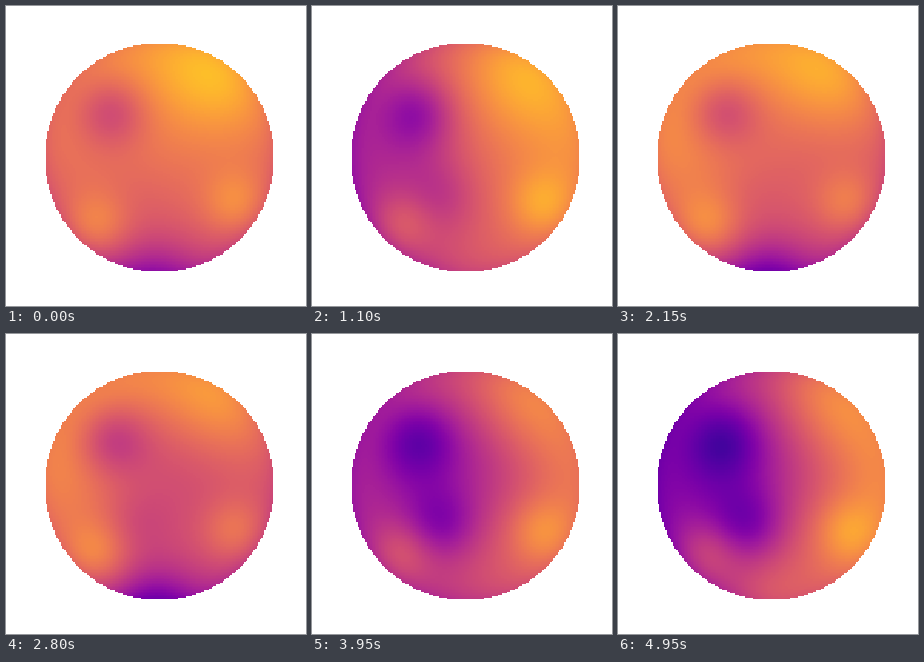
A matplotlib script for the animation above (5000 ms loop, 300 by 300 pixels).

```python
import numpy as np
import matplotlib.pyplot as plt
from matplotlib.animation import FuncAnimation

FRAMES, INTERVAL = 100, 50
GRID = 150

axis = np.linspace(-1, 1, GRID)
x, y = np.meshgrid(axis, axis)
r2 = x ** 2 + y ** 2


def lobe(cx, cy, size):
    """Round bump of height one."""
    return np.exp(-((x - cx) ** 2 + (y - cy) ** 2) / size ** 2)


def rise(time, start, end):
    """Eased step from zero to one."""
    s = np.clip((time - start) / (end - start), 0, 1)
    return s * s * (3 - 2 * s)


upper_left = lobe(-0.42, -0.40, 0.32)
upper_right = lobe(0.50, -0.75, 0.50)
lower_left = lobe(-0.55, 0.58, 0.28)
lower_right = lobe(0.66, 0.40, 0.28)
low_middle = lobe(-0.22, 0.34, 0.32)
bottom = lobe(-0.05, 1.08, 0.38)

# Resting field, left-right swing and slow cooling of the middle
rest = (0.66 - 0.13 * y - 0.08 * r2 ** 4
        - 0.19 * upper_left + 0.13 * upper_right - 0.02 * low_middle
        + 0.13 * lower_left + 0.13 * lower_right - 0.17 * bottom)
swing_map = (-0.07 + 0.20 * x + 0.08 * y - 0.08 * lobe(-0.5, -0.1, 0.45)
             - 0.08 * low_middle + 0.22 * bottom)
cooling_map = -0.24 * lobe(0.05, -0.35, 0.80) - 0.10 * low_middle


def swing(t):
    return (rise(t, 500, 1250) - 1.4 * rise(t, 1500, 2250)
            + 0.65 * rise(t, 2700, 3500) + 1.1 * rise(t, 3650, 4300)
            - 0.2 * rise(t, 4350, 5000))


def cooling(t):
    return rise(t, 1200, 3500) - 0.2 * rise(t, 4300, 4950)


def field(i):
    t = i * INTERVAL
    values = rest + swing(t) * swing_map + cooling(t) * cooling_map
    return np.where(r2 <= 1, values, np.nan)


fig, ax = plt.subplots(figsize=(3, 3), dpi=100)
ax.axis("off")
disc = ax.imshow(field(0), cmap="plasma", vmin=0, vmax=1, interpolation="nearest")


def update(i):
    disc.set_data(field(i))
    return [disc]


anim = FuncAnimation(fig, update, frames=FRAMES, interval=INTERVAL,
                     repeat=True, repeat_delay=0, blit=False)
plt.show()
```
